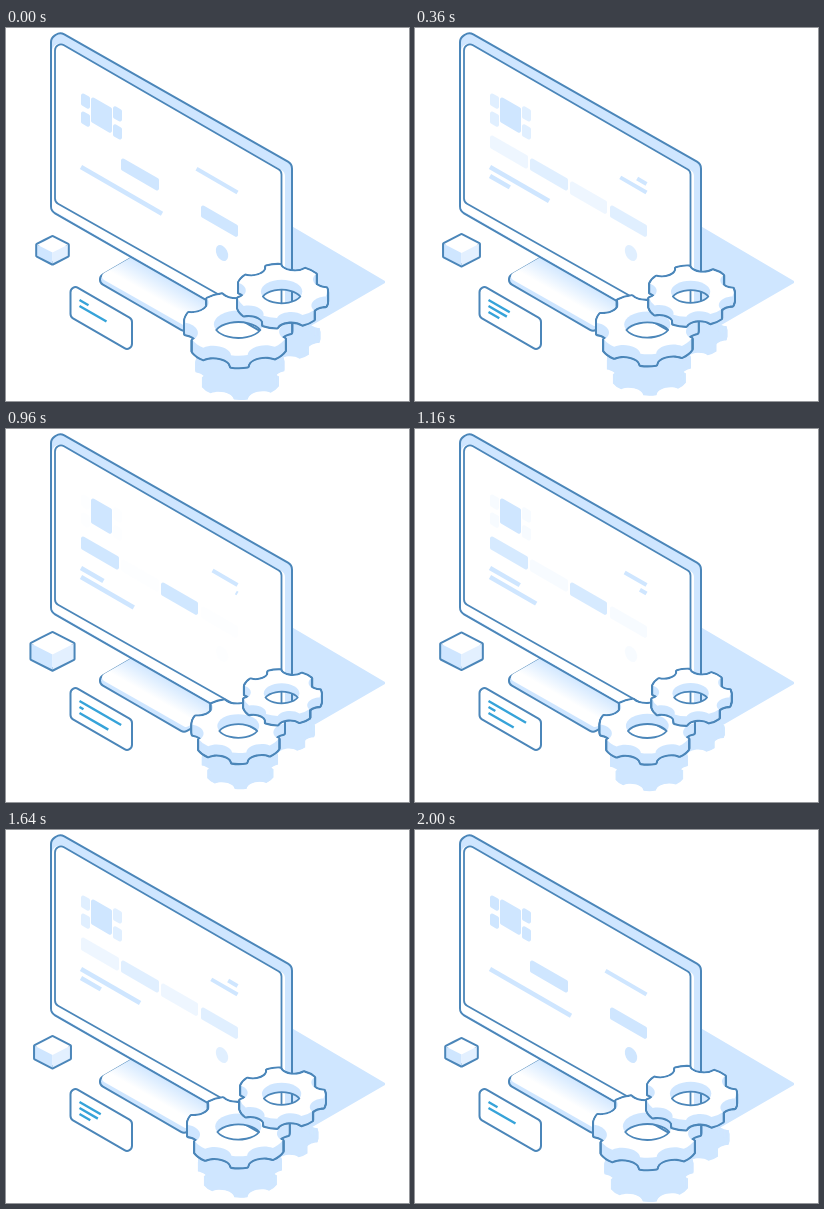
Animation, 403 px wide and 373 px high, one loop 2040 ms. Source, as an HTML page with a canvas:

```html
<!DOCTYPE html>
<html lang="en">
<head>
<meta charset="utf-8">
<title>Monitor and gears</title>
<style>
html, body { margin: 0; width: 100%; height: 100%; overflow: hidden; background: #fff }
canvas { display: block }
</style>
</head>
<body>
<canvas width="403" height="373"></canvas>
<script>
const ctx = document.querySelector('canvas').getContext('2d');
const LINE = '#4b86b9', BLUE = '#cfe6ff', PALE = '#e3f0ff', ACCENT = '#36a3d9';
const SLOPE = 0.577, LOOP = 2040, STEP = 40, HALF = 1000, TEETH = 7;
ctx.lineJoin = 'round';

// Closed polygon with rounded corners
function poly(points, radius = 0) {
  const path = new Path2D(), n = points.length;
  const [ax, ay] = points[n - 1], [bx, by] = points[0];
  path.moveTo((ax + bx) / 2, (ay + by) / 2);
  points.forEach(([x, y], i) => path.arcTo(x, y, ...points[(i + 1) % n], radius));
  path.closePath();
  return path;
}

function paint(path, fill, stroke, width = 2) {
  if (fill) { ctx.fillStyle = fill; ctx.fill(path); }
  if (stroke) { ctx.strokeStyle = stroke; ctx.lineWidth = width; ctx.stroke(path); }
}

// Line running along the isometric axis
function bar(x, y, length, color, width) {
  if (length < 0.5) return;
  const path = new Path2D();
  path.moveTo(x, y);
  path.lineTo(x + length, y + length * SLOPE);
  paint(path, null, color, width);
}

function panel(x, y, w, h, alpha, radius = 2) {
  const d = w * SLOPE;
  ctx.globalAlpha = alpha;
  paint(poly([[x, y], [x + w, y + d], [x + w, y + d + h], [x, y + h]], radius), BLUE);
  ctx.globalAlpha = 1;
}

function backdrop() {
  paint(poly([[284, 197], [379, 253], [379, 255], [303, 299], [284, 299]], 1), BLUE);

  const shade = ctx.createLinearGradient(150, 242, 138, 263);
  shade.addColorStop(0, BLUE);
  shade.addColorStop(1, '#fff');
  paint(poly([[88, 251.5], [130, 227], [221, 279], [178, 303.5]], 6), BLUE, LINE);
  paint(poly([[92, 248.5], [129, 227], [219, 278], [180, 298.5]], 4), shade);

  paint(poly([[45, 10], [54, 4], [286, 136], [286, 304], [275, 315], [45, 183]], 8), BLUE, LINE);
  paint(poly([[46, 11], [279, 144], [279, 308], [272, 312], [46, 182]], 7), '#fff');
  paint(poly([[49, 12], [275.5, 143], [275.5, 302], [49, 174]], 6), '#fff', LINE, 1.8);
}

function screen(p) {
  const q = 1 - p;
  for (const x of [75, 107]) {
    for (const y of [64, 82]) panel(x, y + (x - 75) * 0.4, 9, 13, q);
  }
  panel(85, 68, 21, 26, 1);

  panel(75, 106, 38, 14, p);
  panel(115, 129, 38, 13, q);
  panel(155, 152, 37, 14, p);
  panel(195, 176, 37, 13, q);

  bar(75, 139, 81 - 61 * p, BLUE, 4.5);
  bar(75, 148, 55 * p, BLUE, 4.5);
  const upper = 26 * p, lower = 41 * q;
  bar(231.5 - upper, 156 - upper * SLOPE, upper, BLUE, 4);
  bar(231.5 - lower, 164.5 - lower * SLOPE, lower, BLUE, 4);

  const dot = new Path2D();
  dot.ellipse(216, 225, 5.5, 8.5, -0.45, 0, 7);
  ctx.globalAlpha = q;
  paint(dot, BLUE);
  ctx.globalAlpha = 1;
}

function cube(p) {
  const a = 15.3 + 6 * p, x = 46.5, y = 222.3;
  const at = (u, v) => [x + u * a, y + v * a];
  const top = at(0, -0.87), left = at(-1, -0.36), right = at(1, -0.36), mid = at(0, 0.15);
  const bottom = at(0, 0.87), lowLeft = at(-1, 0.36), lowRight = at(1, 0.36);
  paint(poly([top, right, lowRight, bottom, lowLeft, left]), '#fff', LINE, 4);
  paint(poly([top, right, mid, left]), '#fff');
  paint(poly([left, mid, bottom, lowLeft]), BLUE);
  paint(poly([right, mid, bottom, lowRight]), PALE);
}

function card(p) {
  paint(poly([[64.5, 255.5], [126, 291], [126, 324.5], [64.5, 289]], 5), '#fff', LINE, 2);
  bar(73.5, 272, 9 + 34 * p, ACCENT, 2.4);
  bar(73.5, 278, 27 - 24 * p, ACCENT, 2.4);
  bar(73.5, 284, 30 * p, ACCENT, 2.4);
}

function gearFace(r, turn) {
  const path = new Path2D(), pitch = 360 / TEETH;
  const at = (deg, k) => {
    const a = (deg + turn) * Math.PI / 180;
    return [r * k * Math.cos(a), r * k * 0.59 * Math.sin(a)];
  };
  for (let i = 0; i < TEETH; i++) {
    const t = i * pitch;
    path.lineTo(...at(t - 9, 1));
    path.quadraticCurveTo(...at(t, 1.03), ...at(t + 9, 1));
    path.bezierCurveTo(...at(t + 13, 0.76), ...at(t + pitch - 13, 0.76), ...at(t + pitch - 9, 1));
  }
  path.closePath();
  return path;
}

// Draws the face repeatedly downwards to form a solid body
function sweep(face, height, fill, stroke) {
  for (let d = 0; d <= height; d += 0.5) {
    ctx.save();
    ctx.translate(0, d);
    paint(face, fill, stroke, 4.2);
    ctx.restore();
  }
}

function gearShadow(x, y, r, turn) {
  ctx.save();
  ctx.translate(x, y - 0.11 * r);
  sweep(gearFace(r, turn), 0.22 * r, BLUE);
  ctx.restore();
}

function gear(x, y, r, turn) {
  const face = gearFace(r, turn), h = 0.22 * r, top = y - h / 2;
  const rx = 0.46 * r, ry = 0.26 * r, a = Math.asin(h / 2 / ry);
  ctx.save();
  ctx.translate(x, top);
  sweep(face, h, null, LINE);
  sweep(face, h, BLUE);
  paint(face, '#fff');

  const hole = new Path2D(), gap = new Path2D();
  hole.ellipse(0, 0, rx, ry, 0, 0, 7);
  paint(hole, BLUE);
  gap.ellipse(0, 0, rx, ry, 0, a, Math.PI - a);
  gap.ellipse(0, h, rx, ry, 0, Math.PI + a, 2 * Math.PI - a);
  gap.closePath();
  paint(gap, '#fff');

  // The scene behind shows through the opening
  ctx.save();
  ctx.clip(gap);
  ctx.translate(-x, -top);
  backdrop();
  ctx.restore();
  paint(gap, null, LINE, 1.8);
  ctx.restore();
}

function draw(p) {
  const s = 1 - 0.146 * p;
  ctx.clearRect(0, 0, 403, 373);
  backdrop();
  screen(p);
  cube(p);
  card(p);
  gearShadow(234, 341 - 7.5 * p, 44.5 * s, -14);
  gearShadow(276, 307 - 6 * p, 38 * s, 2);
  gear(232.3, 302, 53 * s, -14);
  gear(275.6, 268.5, 45 * s, 2);
}

function tick() {
  const t = Math.floor(performance.now() % LOOP / STEP) * STEP;
  draw(1 - Math.abs(t - HALF) / HALF);
  requestAnimationFrame(tick);
}
tick();
</script>
</body>
</html>
```
